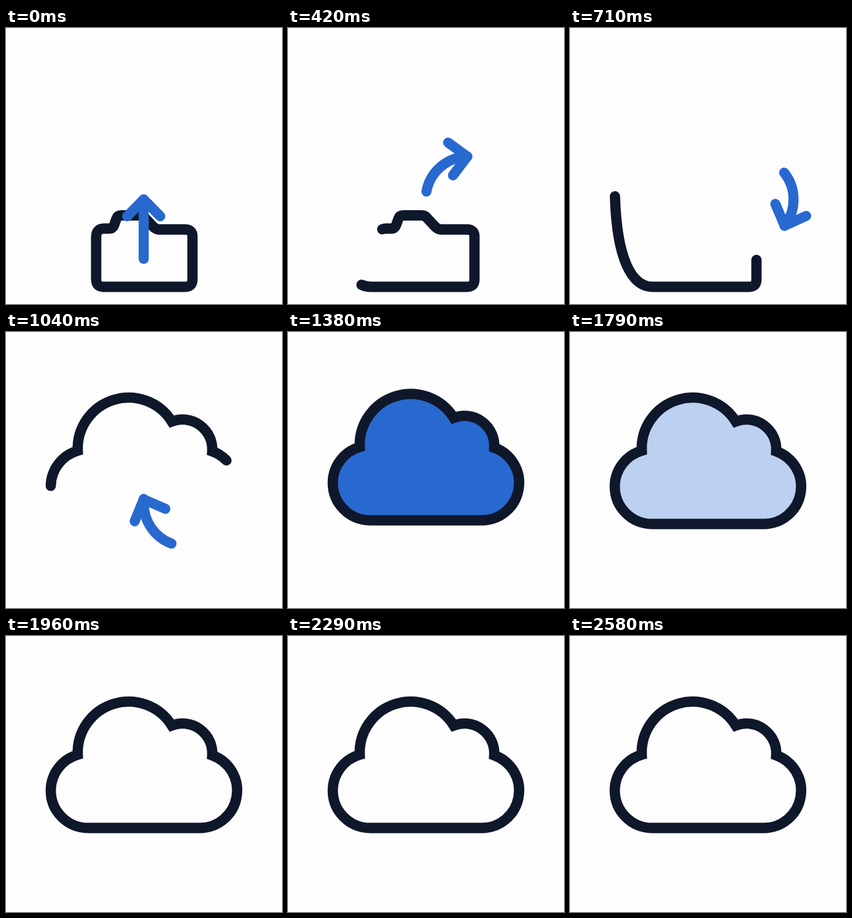
Write an HTML page with a canvas that moves like this. It is 450 by 450 pixels and loops after 2620 ms.

```html
<!DOCTYPE html>
<html lang="en">
<head>
<meta charset="utf-8">
<title>Folder to cloud</title>
<style>
  html, body { margin: 0; width: 100%; height: 100%; overflow: hidden; background: #fdfdfe; }
  canvas { display: block; width: 100vw; height: 100vh; }
</style>
</head>
<body>
<canvas id="stage" width="450" height="450"></canvas>
<script>
const ctx = document.getElementById('stage').getContext('2d');
const LOOP = 2620;
const INK = '#0f172a', BLUE = '#2869d0', PAPER = '#fdfdfe';

// One continuous line: folder outline, connecting sweep, cloud outline.
const folder = 'M159 422 Q147 422 147 410 V341 Q147 327 160 327 H169 Q174 327 176 322 ' +
  'L180 311 Q182 305.5 188 305.5 H218 Q223 305.5 226 309 L239 323 Q244 328.5 250 328.5 ' +
  'H292 Q304 328.5 304 340 V410 Q304 422 292 422 H159';
const sweep = 'H135 C98 422 73 370 73 252';
const cloud = 'A61 61 0 0 1 117 193.5 A83 83 0 0 1 270.3 146 A48.5 48.5 0 0 1 336.2 194.5 ' +
  'A61 61 0 0 1 316 313 H134 A61 61 0 0 1 73 252';
const outline = new Path2D(folder + sweep + cloud);
const cloudShape = new Path2D('M73 252' + cloud + 'Z');

const lengthOf = d => {
  const path = document.createElementNS('http://www.w3.org/2000/svg', 'path');
  path.setAttribute('d', d);
  return path.getTotalLength();
};
const folderEnd = lengthOf(folder);
const cloudStart = lengthOf(folder + sweep);
const cloudEnd = lengthOf(folder + sweep + cloud);

// Arrow track: straight up, one clockwise turn, straight up again.
const X = 224.5, Y = 279.5, R = 70, RUN_UP = 100;
const TURN = 2 * Math.PI * R;
const track = new Path2D();
track.moveTo(X, Y + RUN_UP);
track.lineTo(X, Y);
track.arc(X + R, Y, R, Math.PI, 3 * Math.PI);
track.lineTo(X, Y - 200);

const clamp = v => Math.min(1, Math.max(0, v));
const phase = (t, from, to) => clamp((t - from) / (to - from));

function strokePart(path, from, to, color, width) {
  ctx.strokeStyle = color;
  ctx.lineWidth = width;
  ctx.setLineDash([to - from, 10000]);
  ctx.lineDashOffset = -from;
  ctx.stroke(path);
  ctx.setLineDash([]);
}

function arrowTravel(t) {
  const speed = 0.547, ramp = 450;
  const s = t < ramp ? speed * t * t / (2 * ramp) : speed * (t - ramp / 2);
  return Math.min(s, 560);
}

function drawArrow(t) {
  const s = arrowTravel(t);
  const shaft = 97 - 0.005 * t;
  strokePart(track, RUN_UP + s - shaft, RUN_UP + s, BLUE, 16.4);

  const angle = Math.min(s, TURN) / R;
  const x = X + R - R * Math.cos(angle);
  const y = Y - R * Math.sin(angle) - Math.max(0, s - TURN);
  ctx.save();
  ctx.translate(x, y);
  ctx.rotate(Math.min(2 * Math.PI, s / R * 0.925));
  ctx.lineJoin = 'round';
  ctx.beginPath();
  ctx.moveTo(-27, 27.5);
  ctx.lineTo(0, 0);
  ctx.lineTo(27, 27.5);
  ctx.stroke();
  ctx.restore();
}

function draw(t) {
  ctx.fillStyle = PAPER;
  ctx.fillRect(0, 0, 450, 450);
  ctx.lineCap = 'round';
  ctx.lineJoin = 'miter';

  const lift = 6 * Math.sin(Math.PI * phase(t, 1220, 1540));
  const fill = phase(t, 1220, 1340) * (1 - phase(t, 1500, 1920));
  const tail = cloudStart * Math.pow(phase(t, 0, 1040), 2.15);
  const head = folderEnd + (cloudEnd - folderEnd) * Math.pow(phase(t, 0, 1226), 3.1);

  ctx.save();
  ctx.translate(0, -lift);
  ctx.globalAlpha = fill;
  ctx.fillStyle = BLUE;
  ctx.fill(cloudShape);
  ctx.globalAlpha = 1;
  strokePart(outline, tail, head, INK, 16.8);
  ctx.restore();

  if (t < 1340) drawArrow(t);
}

function tick() {
  draw(performance.now() % LOOP);
  requestAnimationFrame(tick);
}
tick();
</script>
</body>
</html>
```
